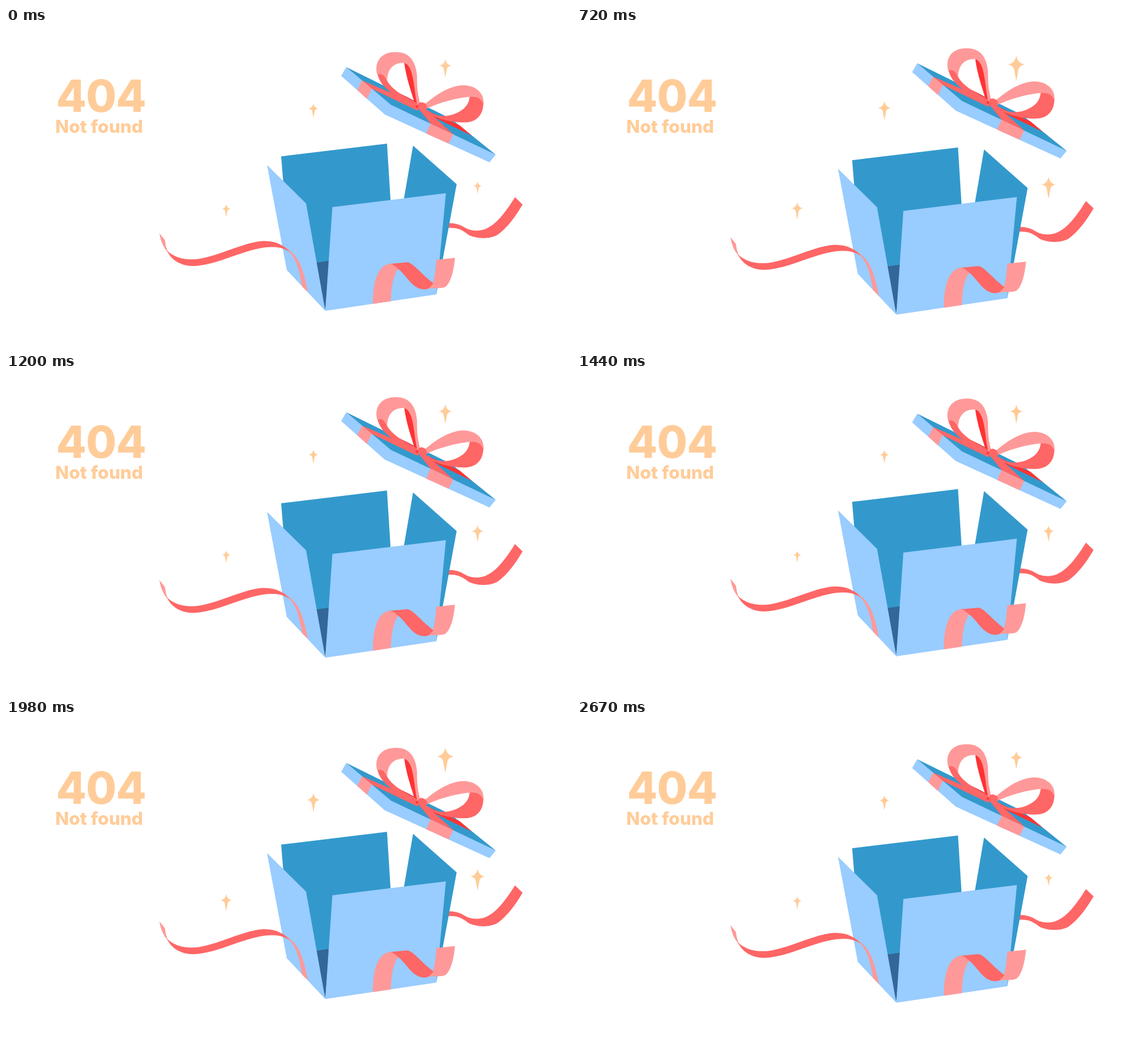
An HTML page for the animation above (2.7 s loop, 998 by 561 pixels).

```html
<!DOCTYPE html>
<html lang="en">
<head>
<meta charset="utf-8">
<title>404 Not found</title>
<style>
  html, body { margin: 0; width: 100%; height: 100%; overflow: hidden; background: #fff; }
  svg { display: block; width: 100vw; height: 100vh; }
  text { font-family: Poppins, Inter, sans-serif; font-weight: 800; }
  .sky { fill: #99ccff; }
  .blue { fill: #3399cc; }
  .navy { fill: #336699; }
  .pink { fill: #ff9999; }
  .coral { fill: #ff6666; }
  .red { fill: #ff3333; }
  .peach { fill: #ffcc99; }
</style>
</head>
<body>
<svg viewBox="0 0 998 561">
  <g class="peach">
    <text x="88.5" y="147.7" font-size="78" letter-spacing="-1">404</text>
    <text x="87" y="185" font-size="31.6">Not found</text>
  </g>

  <g id="box">
    <!-- ribbon behind the box -->
    <path class="coral" d="M774 345C795 342 803 348 816 355C848 365 870 345 899 298.5L912.5 311.5C899 334 885 353 868 365C852 374 829 371 817 365C804 355 797 351 774 353Z"/>
    <path class="blue" d="M486 226.5L673 204L685 396L502 421Z"/>
    <path class="blue" d="M719 207.5L796 275.5L760 470L686 400Z"/>
    <path class="navy" d="M540 415L572 410.5L564 498Z"/>
    <path class="sky" d="M461 241.5L530 309.5L564 499L496 427Z"/>
    <path class="sky" d="M576.5 316L777 291.5L760 470L564 499Z"/>

    <!-- left ribbon -->
    <path class="pink" d="M271 362L280.5 374Q282 386 286 396Q274 383 271 362Z"/>
    <path class="coral" d="M284 392C298 408 328 412 354 404.5C388 396 424 378 452 376C475 374.5 492 383 505 398C493 388 481 386 466 386.5C425 388 375 418 332 420C307 420 291 408 284 392Z"/>
    <path class="pink" d="M494 388C519 401 526 431 533.5 466L523 456C518 425 512 403 494 388Z"/>

    <!-- front ribbon -->
    <path class="pink" d="M648 486.7C648 451 655 416 682 415.5L693 424C684 438 680 458 680 482Z"/>
    <path class="pink" d="M760 409L793 405.5C791 428 786 449 776 457C767 460 755 458 740 461L754 450C758 438 759 423 760 409Z"/>
    <path class="coral" d="M679 416L709 413.3C720 415 730 431 755 450.5C748 459 745 461 739 461C717 461 708 436 692 424.5C687 420 684 417 679 416Z"/>
  </g>

  <g id="lid">
    <path class="sky" d="M601 69L592 84.5L669 152.5L854 237L865 223.5L680 135Z"/>
    <path class="blue" d="M601 69L786 160L865 223.5L680 135.5Z"/>
    <path class="pink" d="M629 92.5L646 107L637.5 125L620.5 109.5Z"/>
    <path class="pink" d="M750 168.5L790 187.5L782 204L742 186Z"/>
    <path class="coral" d="M629 92.5L646 107L727 146L730 136Z"/>
    <path class="red" d="M671 103.5L712 123.5L733 136L726 141Z"/>
    <path class="red" d="M744 146L801 171.5L823 190L745 152Z"/>
    <path class="coral" d="M731 145L750 168.5L790 187.5L742 144Z"/>

    <!-- left loop -->
    <path class="coral" d="M655.5 78Q664 78 671 88C677 106 702 121 730 134L722 139C690 121 660 107 655.5 78Z"/>
    <path class="red" d="M703.5 62C711 61 721 70 723 92L731 135L721 130C715 109 708 92 703.5 62Z"/>
    <path class="pink" d="M655.5 82C650 58 664 43 686 42.5C711 41 724 57 726 84C726 105 727 120 732 134L727 136C720 114 722 64 702 61.5C682 61 673 76 673.5 93Q668 78 655.5 82Z"/>

    <!-- right loop -->
    <path class="coral" d="M819 121L841 119C847 139 841 165 812 166.5C791 167 766 163 741 148L745 145C758 157 780 159 800 148C813 141 818 132 819 121Z"/>
    <path class="pink" d="M738 136C756 120 783 101 809 101C832 102 845 116 843.5 135C838 121 829 120 813 122C786 126 765 132 741 143Z"/>
    <path class="coral" d="M728 134Q732 129 738 132Q744 134 743.5 141Q741 148 733 147Q726 143 728 134Z"/>
  </g>
  <g id="stars" class="peach"></g>
</svg>
<script>
const LOOP = 2700, STEP = 30, DRIFT = 7.2;
const STAR = "M0-1Q.11-.36 .67-.3Q.23-.22 .17 .08L0 1L-.17 .08Q-.23-.22-.67-.3Q-.11-.36 0-1Z";
const byId = id => document.getElementById(id);
const box = byId("box"), lid = byId("lid");

// keys: size at each quarter of the loop
const stars = [
  { x: 776, y: 71, r: 16, keys: [1, 1.45, 1, 1.45, 1] },
  { x: 543, y: 146, r: 13, keys: [1, 1.34, 0.86, 1.33, 1] },
  { x: 389, y: 322.5, r: 11.5, keys: [1, 1.35, 0.86, 1.36, 1] },
  { x: 833, y: 281.8, r: 11, keys: [1, 1.82, 1.27, 1.82, 1] }
];
for (const s of stars) {
  s.el = document.createElementNS("http://www.w3.org/2000/svg", "path");
  s.el.setAttribute("d", STAR);
  byId("stars").append(s.el);
}

function quarterLerp(keys, p) {
  const i = Math.floor(p * 4);
  return keys[i] + (keys[i + 1] - keys[i]) * (p * 4 - i);
}

function draw(ms) {
  const p = Math.floor((ms % LOOP) / STEP) * STEP / LOOP;
  const dy = quarterLerp([0, DRIFT, 0, -DRIFT, 0], p);
  box.setAttribute("transform", `translate(0 ${dy})`);
  lid.setAttribute("transform", `translate(0 ${-dy})`);
  for (const s of stars) {
    s.el.setAttribute("transform", `translate(${s.x} ${s.y}) scale(${s.r * quarterLerp(s.keys, p)})`);
  }
}

const start = performance.now();
function tick() {
  draw(performance.now() - start);
  requestAnimationFrame(tick);
}
tick();
</script>
</body>
</html>
```
